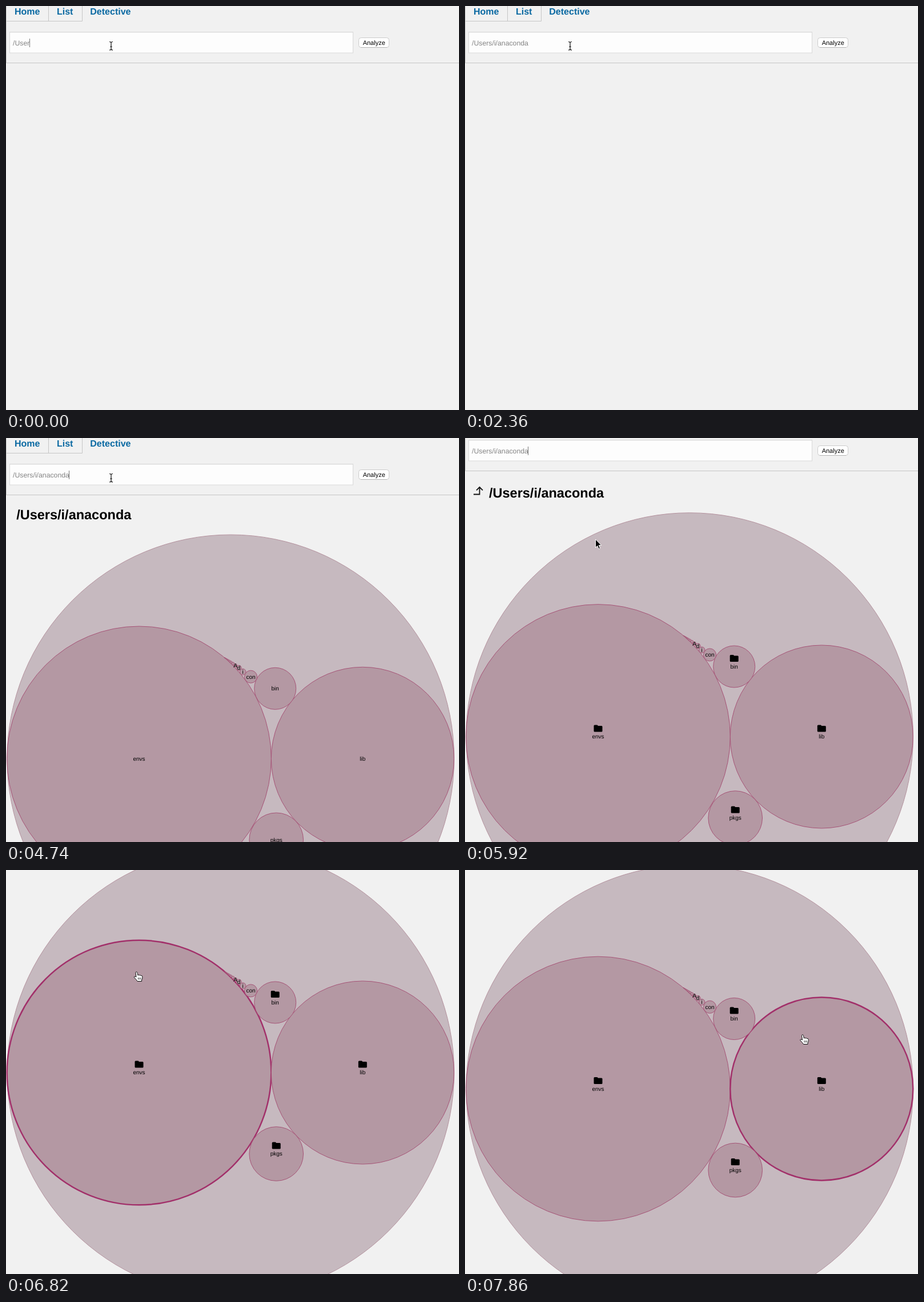
These frames come from a looping animation (793 by 706 pixels, 8 s). An HTML page:

```html
<!DOCTYPE html>
<html lang="en">
<head>
<meta charset="utf-8">
<title>Disk usage circles</title>
<style>
html, body { margin: 0; width: 100%; height: 100%; overflow: hidden; background: #f1f1f1; }
svg { display: block; width: 793px; height: 706px; font-family: "Liberation Sans", Arial, sans-serif; text-rendering: geometricPrecision; }
.rule { fill: none; stroke: #c6c6c6; }
.tab { font: bold 16px "Liberation Sans", Arial, sans-serif; fill: #0a69a2; }
.label { font-size: 10px; text-anchor: middle; }
.outer { fill: #c6b9bf; stroke: #b4929e; }
.dir { fill: #b498a3; stroke: #a65477; }
.dir.hover { stroke: #a2306a; stroke-width: 2.5; }
</style>
</head>
<body>
<svg viewBox="0 0 793 706">
  <defs>
    <path id="folder" d="M-7.5-4.5q0-1.5 1.5-1.5h4.5l1.5 1.5h6q1.5 0 1.5 1.5v7.5q0 1.5-1.5 1.5h-12q-1.5 0-1.5-1.5z"/>
  </defs>
  <g id="page">
    <path class="rule" d="M.5 0V99.5H793M0 26.5H133.5V0M74.5 0V26"/>
    <text class="tab" x="15" y="15">Home</text>
    <text class="tab" x="89" y="15">List</text>
    <text class="tab" x="147.3" y="15">Detective</text>
    <rect x="6.5" y="45.5" width="601" height="36.5" fill="#fdfdfd" stroke="#d9d9d9"/>
    <path d="M7 46.5H607" stroke="#f0f0f0"/>
    <text id="path" x="12.05" y="69" font-size="12.27" fill="#858585"></text>
    <rect id="caret" y="57" width="1" height="15" fill="#777"/>
    <rect x="617.5" y="55.5" width="53" height="17" rx="4" fill="#fff" stroke="#cbcbcb"/>
    <path d="M621 72.5H667" stroke="#b4b4b4"/>
    <text x="644.2" y="68" font-size="11" text-anchor="middle">Analyze</text>
    <g id="result">
      <path class="icon" d="M15 140.5H25.5V128M20 133.3L25.5 127.8L31 133.3" fill="none" stroke="#111" stroke-width="1.8"/>
      <text id="title" y="145.7" font-size="23.5" font-weight="bold"></text>
      <g id="chart"></g>
    </g>
  </g>
  <g id="cursor">
    <path id="ibeam" d="M-3-7.5Q0-7.5 0-5.5Q0-7.5 3-7.5M0-6V6M-3 7Q0 7 0 5Q0 7 3 7M-1.8 1H1.8" fill="none" stroke="#111" stroke-width="1.2"/>
    <path id="arrow" d="M0 0V14.5L3.3 11.5L5.6 16.7L8 15.7L5.7 10.5H10.2Z" fill="#000" stroke="#fff"/>
    <g id="hand" fill="#fff" stroke="#111" stroke-linejoin="round">
      <path d="M-1 10L-2 2.5Q-2 1 -.6 1Q.7 1 1 2.5L1.8 7Q3.2 5.6 4.5 7Q6 6 7.2 7.6Q9.4 7 9.8 9.2L9.6 13L8.5 15V17.5H1L-1 14.5L-4.6 10.8Q-5 8.8 -3 9Z"/>
      <path d="M2.5 11V14.5M4.7 11V14.5M6.9 11V14.5" stroke-width=".8"/>
    </g>
  </g>
</svg>
<script>
const LOOP = 8000, FOLDER = "/Users/i/anaconda";
const $ = id => document.getElementById(id);

function add(name, attrs, text = "") {
  const el = document.createElementNS("http://www.w3.org/2000/svg", name);
  for (const key in attrs) el.setAttribute(key, attrs[key]);
  el.textContent = text;
  return $("chart").appendChild(el);
}

const CY = 564;
const circle = (cx, cy, r, cls = "dir") => add("circle", { cx, cy, r, class: cls });
function dir(name, x, y, r, icon) {
  const el = circle(x, y, r);
  if (icon) add("use", { href: "#folder", class: "icon", transform: `translate(${x} ${y - 14.5})` });
  add("text", { class: "label", x, y: y + 3.4 }, name);
  return el;
}

circle(393.2, CY, 391.3, "outer");
const envs = dir("envs", 233, CY, 231.3, true);
const lib = dir("lib", 624.3, CY, 160, true);
dir("bin", 471.2, 441.5, 36.5, true);
dir("pkgs", 473.2, 706, 47.3, true);

// Ever smaller circles, each touching envs and the one before it
const small = [["con", 11], ["i", 5.3], ["d", 4.5], ["A", 3]];
let angle = 36.2 * Math.PI / 180;
for (let k = 0, r = 11; k < 20; k++) {
  const [name, size] = small[k] || ["", r * .78];
  if (k) angle += 2 * Math.sqrt(r * size) / (231.3 + (r + size) / 2);
  r = size;
  const d = 231.3 + r;
  dir(name, 233 + d * Math.cos(angle), CY - d * Math.sin(angle), r);
}

// Rows: start time, then the values that hold from it
const typed = [[0, 5], [140, 6], [290, 7], [580, 8], [730, 9], [1030, 10], [1170, 12], [1470, 13], [1610, 15], [1760, 17]];
const scrolls = [[0, 0], [5770, 10], [5920, 42], [6070, 140], [6220, 214], [6820, 210], [6970, 200], [7110, 189], [7260, 181.5]];
const moves = [
  [0, 184, 70, "ibeam"], [5330, 190, 79, "ibeam"], [5480, 206, 122, "arrow"],
  [5630, 222, 162, "arrow"], [5770, 228.5, 177, "arrow"], [6220, 229, 177, "hand"],
  [7110, 236, 181, "hand"], [7260, 252, 190, "hand"],
  [7710, 525, 283, "hand"], [7860, 591.5, 287, "hand"]
];
const caretOff = [[2360, 2810], [3250, 3850], [4290, 4740]];
const at = (rows, t) => rows.filter(row => row[0] <= t).pop().slice(1);
const show = (el, on) => el.setAttribute("visibility", on ? "visible" : "hidden");

function draw(t) {
  const [count] = at(typed, t), [scroll] = at(scrolls, t), [x, y, shape] = at(moves, t);
  const loaded = t >= 4890;

  $("path").textContent = FOLDER.slice(0, count);
  $("caret").setAttribute("x", Math.floor(12.05 + $("path").getComputedTextLength()));
  show($("caret"), !caretOff.some(([a, b]) => t >= a && t < b));

  $("page").setAttribute("transform", `translate(0 ${-scroll})`);
  $("result").style.display = t >= 4740 ? "" : "none";
  $("result").setAttribute("transform", `translate(0 ${loaded ? 0 : -3.7})`);
  $("title").textContent = FOLDER;
  $("title").setAttribute("x", loaded ? 42 : 18.2);
  document.querySelectorAll(".icon").forEach(el => show(el, loaded));

  envs.classList.toggle("hover", t >= 6220 && t < 7710);
  lib.classList.toggle("hover", t >= 7710);
  $("cursor").setAttribute("transform", `translate(${x} ${y})`);
  for (const id of ["ibeam", "arrow", "hand"]) show($(id), id === shape);
}

function frame() {
  draw(performance.now() % LOOP);
  requestAnimationFrame(frame);
}
frame();
</script>
</body>
</html>
```
